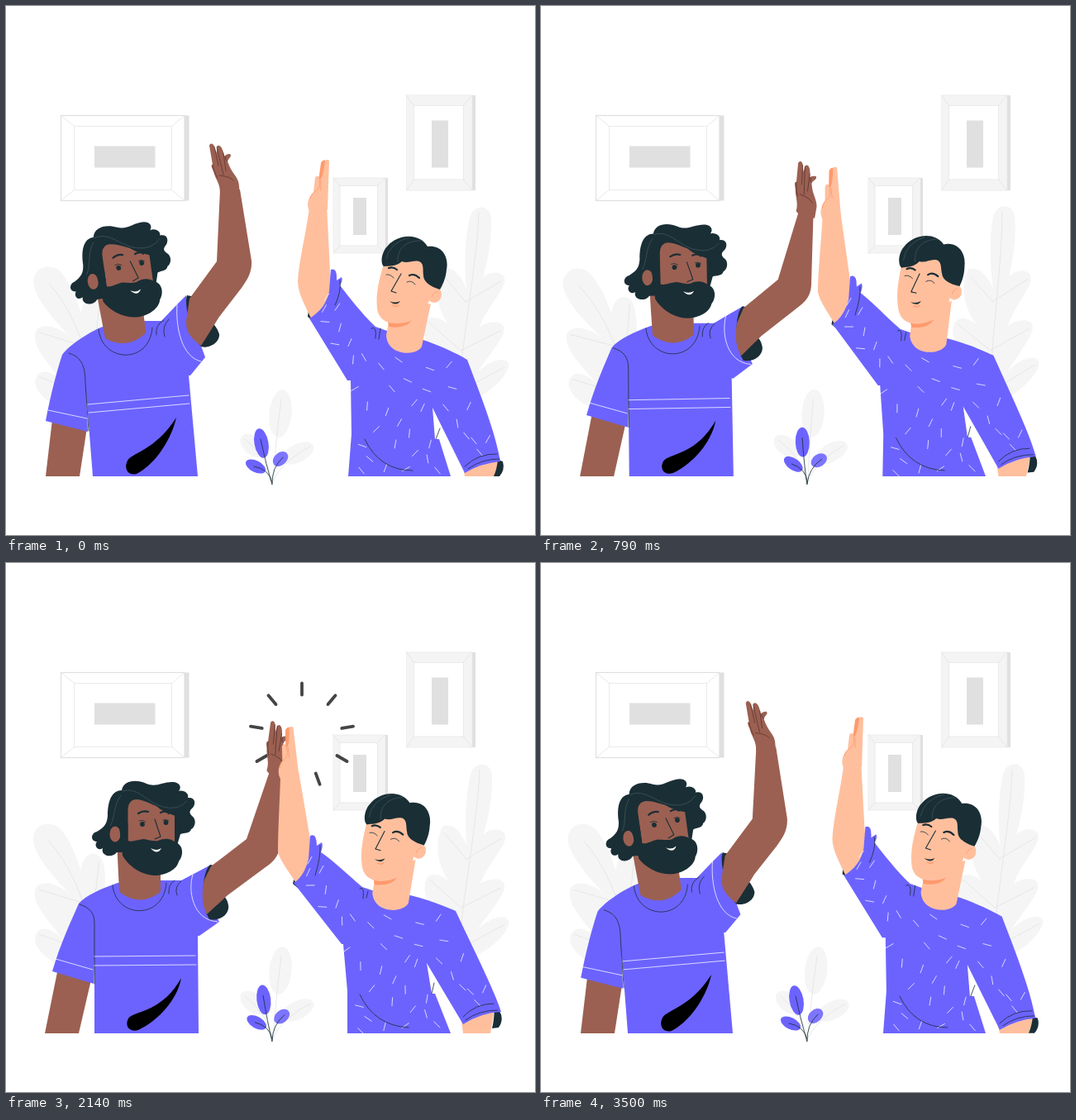
These frames come from a looping animation (640x640 px, 3.57 s). An HTML page:

```html
<!DOCTYPE html>
<html lang="en">
<head>
<meta charset="utf-8">
<title>High five</title>
<style>
html, body { margin: 0; width: 100%; height: 100%; overflow: hidden; background: #fff; }
svg { display: block; width: 100vw; height: 100vh; }
path, line { stroke-linecap: round; stroke-linejoin: round; }
.p { fill: #6c63ff; }
.d { fill: #1a2e35; }
.brown { fill: #9b6052; }
.peach { fill: #ffbf9d; }
.orange { fill: #ff9a6c; }
.k { fill: none; stroke: #1a2e35; stroke-width: .8; }
.w { fill: none; stroke: #fff; stroke-width: .75; }
.thick { stroke-width: 2.2; }
.nose { stroke-width: 1.1; }
.hair { fill: none; stroke: #4a5f68; stroke-width: .6; }
.crease { fill: none; stroke: #4b2a25; stroke-width: .6; }
.leaf { fill: #f5f5f5; }
.vein { fill: none; stroke: #e3e3e3; stroke-width: .8; }
</style>
</head>
<body>
<svg viewBox="0 0 640 640">
  <g id="frames"></g>
  <g id="plantL">
    <path class="leaf" d="M100 505C80 492 38 480 35 455C38 436 56 440 70 457C52 432 30 412 36 393C45 381 66 390 78 401C56 378 28 346 34 328C40 311 60 312 69 325C80 340 85 354 91 372C92 354 107 345 116 358C123 372 120 400 118 440Z"/>
    <path class="vein" d="M52 336Q88 375 108 460M40 395L96 412M113 362L106 420M40 449L100 470"/>
  </g>
  <g id="plantR">
    <path class="leaf" d="M545 500C530 460 512 430 506 395C505 374 520 372 535 385C519 362 518 335 528 318C540 314 550 325 557 342C553 310 557 262 563 251C569 240 586 240 587 258C588 285 582 310 577 328C590 318 606 322 603 335C598 350 580 368 573 388C590 378 606 382 602 395C598 408 578 430 570 444C585 427 610 422 608 437C602 455 580 470 560 480Z"/>
    <path class="vein" d="M572 250C570 310 552 400 545 490M599 333L556 358M530 327L556 358M598 393L550 417M512 383L550 417M603 437L546 468"/>
  </g>
  <g id="burst" stroke="#454545" stroke-width="3.8"></g>
  <g id="left"></g>
  <g id="right"></g>
  <g id="grayPlant">
    <ellipse class="leaf" cx="332" cy="493" rx="13.5" ry="29" transform="rotate(6 332 493)"/>
    <ellipse class="leaf" cx="299" cy="532" rx="18" ry="11" transform="rotate(40 299 532)"/>
    <ellipse class="leaf" cx="353" cy="541" rx="21" ry="11" transform="rotate(-27 353 541)"/>
    <path class="vein" d="M333 476Q326 530 323 575M289 524Q315 545 322 572M368 533Q335 550 323 574"/>
  </g>
  <g id="purplePlant">
    <ellipse class="p" cx="309" cy="529" rx="8.5" ry="18" transform="rotate(-10 309 529)"/>
    <ellipse class="p" cx="302" cy="557" rx="13" ry="7" transform="rotate(27 302 557)"/>
    <ellipse cx="332" cy="548" rx="10.5" ry="7.5" fill="#7d75ff" transform="rotate(-42 332 548)"/>
    <path class="k" d="M308 524Q315 556 322 579Q321 559 335 546M300 557Q318 560 322 576"/>
  </g>
</svg>
<script>
const LOOP = 3570, TAU = Math.PI * 2;
const $ = id => document.getElementById(id);
const clamp = x => Math.max(0, Math.min(1, x));
const ease = x => (1 - Math.cos(Math.PI * clamp(x))) / 2;
const lerp = (a, b, k) => a + (b - a) * k;

function add(parent, tag, attrs) {
  const el = document.createElementNS('http://www.w3.org/2000/svg', tag);
  for (const name in attrs) el.setAttribute(name, attrs[name]);
  return parent.appendChild(el);
}
function group(parent, html) {
  const g = add(parent, 'g', {});
  g.innerHTML = html;
  return g;
}

// Path between two poses that share the same commands
const num = /-?\d+(\.\d+)?/g;
function mix(a, b, k) {
  const to = b.match(num);
  let i = 0;
  return a.replace(num, n => lerp(+n, +to[i++], k).toFixed(2));
}

const parts = { left: [], right: [] };
function part(side, cls, a, b) {
  parts[side].push({ el: add($(side), 'path', { class: cls }), a, b });
}

// Pictures on the wall: outer box, inner inset, depth, plate
function picture(x, y, w, h, ix, iy, iw, ih, depth, plate, fill, edge) {
  const g = $('frames');
  add(g, 'rect', { x: x + w, y, width: depth, height: h, fill: '#e0e0e0' });
  add(g, 'rect', { x, y, width: w, height: h, fill, stroke: edge, 'stroke-width': 1.2 });
  add(g, 'rect', { x: ix, y: iy, width: iw, height: ih, fill: '#fff', stroke: '#e6e6e6', 'stroke-width': .8 });
  const X = x + w, Y = y + h, jx = ix + iw, jy = iy + ih;
  add(g, 'path', { class: 'vein', d: `M${x} ${y}L${ix} ${iy}M${X} ${y}L${jx} ${iy}M${x} ${Y}L${ix} ${jy}M${X} ${Y}L${jx} ${jy}` });
  const [px, py, pw, ph] = plate;
  add(g, 'rect', { x: px, y: py, width: pw, height: ph, fill: '#e0e0e0' });
}
picture(66.5, 132.5, 149.5, 103, 82.5, 145.5, 118, 77, 5.5, [107, 169.5, 73.5, 26], '#fff', '#e0e0e0');
picture(484.5, 108, 79, 115, 493.5, 120.5, 60, 89.5, 4.5, [515, 138.5, 20, 57], '#f4f4f4', '#f0f0f0');
picture(396, 208, 62.5, 91, 404, 217.5, 45.5, 72.5, 3.5, [420, 232, 16, 45], '#f4f4f4', '#f0f0f0');

// Left man
part('left', 'brown', 'M56 500L48 569L89 569L98 510Z', 'M63 490L47 569L88 569L104 500Z');
part('left', 'p',
  'M117 388C97 396 75 412 68 422C62 440 54 470 48 502L99 515L97 468L105 569L232 569L221 447L223 447L241 425C233 402 220 372 218 350L207 361L188 381L168 381Z',
  'M135 387C115 394 97 402 88 412C78 435 66 460 56 494L106 509L107 478L107 569L233 569L232 451L234 451L258 434C246 414 246 385 248 365L233 373L212 384L187 384Z');
part('left', 'k', 'M76 420C90 424 96 434 96 456L100 514', 'M89 413C102 417 107 424 107 436L107 509');
part('left', 'k', 'M112 391C116 432 174 434 177 389M182 398Q180 386 191 380M192 400Q188 388 197 379',
  'M129 390C133 431 191 432 194 387M197 400Q196 389 204 384M207 402Q203 392 212 385');
part('left', 'w', 'M99 482L221 471M100 492L222 481M51 489L98 499', 'M107 476L229 475M107 487L230 486M60 479L105 492');
part('left', 'w', 'M207 361C205 390 213 425 236 430', 'M226 377C220 395 225 432 256 434');
part('left', 'blot', 'M206 498C200 525 180 555 158 566C148 569 142 560 147 550C153 540 180 538 206 498Z',
  'M212 502C207 530 182 555 160 565C150 568 143 561 148 551C155 541 188 545 212 502Z');
const headL = group($('left'), `
  <path class="brown" d="M134 335L137 398Q162 417 187 398L187 365Z"/>
  <path class="d" d="M134 350C128 358 114 354 117 345C111 349 106 342 110 337C102 337 102 327 110 325C118 320 122 317 123 306C123 286 129 275 140 275C142 263 157 261 170 267C182 272 190 264 203 265C210 266 213 271 209 276C215 274 222 279 220 284C229 283 230 291 226 296C221 300 222 303 225 306C231 310 229 320 224 322C222 328 216 326 211 328L206 345L140 350Z"/>
  <path class="brown" d="M147.5 300C147.5 291 151 286 158 286C172 287 180 297 204 299L204 345L147.5 350Z"/>
  <ellipse class="brown" cx="132" cy="328" rx="6.5" ry="9.5"/>
  <path class="d" d="M137 318L147.5 314L147.5 336C153 338 157 335 167 334C173 335 178 337 184 336C194 331 202 335 205 338C215 341 215 354 209 361C207 371 193 378 180 378C162 377 148 366 141 354Z"/>
  <path class="d" d="M174 283C180 297 192 301 205 306L212 290Z"/>
  <path class="hair" d="M141 276C160 270 170 290 190 295Q208 300 219 288M126 318C132 309 130 292 139 281"/>
  <path class="k thick" d="M160 303Q166 299 172 301M187 302Q193 299 197 303"/>
  <circle class="d" cx="165" cy="316" r="2.9"/><circle class="d" cx="193.5" cy="314" r="2.9"/>
  <path class="k nose" d="M180 310L187 331L180 334"/>
  <path class="k" d="M161 312Q165 310 169 313M190 311Q194 309 197 312"/>
  <path d="M175 345Q182 349 188 345Q183 354 175 345Z" fill="#fff"/>`);
part('left', 'd', 'M219 350C215 360 224 400 236 412C246 415 259 407 258 397C255 388 250 383 246 380L224 351Z',
  'M247 365C236 375 236 415 246 431C258 434 271 425 269 414C268 407 265 404 262 402L252 366Z');
part('left', 'brown',
  'M222 354L255 309L259 222L283 222L297 308C298 322 292 331 285 341L258 376L236 411C224 403 217 393 218 381Z',
  'M248 367L291 334L319 252L336 250L331 343C330 355 323 362 314 368L268 402L243 425C236 412 237 395 240 383Z');
const handL = group($('left'), `
  <path class="brown" d="M259 226C259 214 253 209 251 200C248 194 248 192 250 192L246 169C247 165 251 166 252 170L255 178L255 170C257 167 261 169 263 177L265 184C263 181 267 179 271 179C274 182 269 184 268 188L270 193C274 203 282 208 282 218L283 228Q270 234 259 226Z"/>
  <path class="crease" d="M250 192Q252 202 256 208M252 170L257 193M255 171L263 204M263 178L266 199M268 188Q265 186 265 182M258 205Q271 206 275 211"/>`);

// Right man
part('right', 'peach', 'M555 569L553 559Q575 545 598 548L590 569Z', 'M553 569L551 554Q572 540 591 540L586 569Z');
part('right', 'd', 'M590 569Q594 560 595 549L601 551Q604 561 597 569Z', 'M588 563Q590 556 591 540L597 542Q603 552 596 562Z');
part('right', 'd', 'M366 368L365 376L372 381L385 360Z', 'M349 380L347 388L354 394L366 368Z');
part('right', 'peach',
  'M367 244C363 275 354 310 353 334C354 350 362 362 369 378L380 376L394 345L392 320L388 240Z',
  'M332 260C331 290 329 325 329 350C332 360 340 370 352 389L362 385L372 355L367 328L354 252Z');
part('right', 'p',
  'M461 393L447 388C430 372 415 352 404 338Q408 332 406 328L400 332Q401 316 393 319L391 345C388 360 380 370 367 378L413 453L417 453L418 518L414 569L538 569L524 524L519 524L516 486L555 565Q575 553 598 551C592 515 572 465 558 428C545 420 525 411 505 404Z',
  'M446 397L431 392C412 376 396 360 381 350Q384 342 382 338L376 342Q376 326 368 330L366 358C363 370 357 382 348 387L406 461L408 461L413 518L413 569L538 569L519 521L515 521L509 484L553 558Q575 544 599 543C590 515 562 460 544 421C530 415 510 407 489 402Z');
const dashes = [
  388,352,-55, 385,366,-60, 401,364,125, 386,382,5, 404,389,105, 416,407,115, 398,409,10, 433,425,60, 420,428,95,
  422,463,-30, 454,436,50, 475,428,35, 513,439,20, 536,434,-50, 486,453,25, 509,465,20, 540,462,15, 467,463,50,
  437,484,95, 461,491,110, 476,504,-60, 494,480,-50, 504,486,115, 448,512,-45, 488,517,95, 431,532,20, 471,530,100,
  440,548,40, 495,541,-45, 510,548,80, 513,530,105, 430,562,50, 459,559,110, 484,560,-30, 522,562,50, 546,505,80,
  560,484,115, 557,520,50, 566,526,50, 583,524,-60, 573,540,50, 532,486,50];
const dashEl = add($('right'), 'path', { class: 'w' });
part('right', 'k', 'M434 524Q452 562 492 562M442 390Q449 386 447 402M453 390L451 403M398 362Q406 345 404 332M520 524L525 511',
  'M428 522Q446 560 487 562M428 394Q434 390 432 406M438 397L436 405M374 378Q381 355 380 342M515 521L518 508');
part('right', 'k', 'M555 557Q572 541 594 542M559 560Q575 548 597 548', 'M553 549Q568 533 590 533M556 553Q572 541 595 541');
const headR = group($('right'), `
  <path class="peach" d="M465 375L460 398C461 424 497 424 503 412L514 360Z"/>
  <path class="orange" d="M462 381L491 380Q484 391 463 388Z"/>
  <path class="peach" d="M458 308C452 330 447 345 449 366C451 381 464 385 476 384C492 383 502 374 509 366L520 330L500 300Z"/>
  <ellipse class="peach" cx="518" cy="349" rx="9" ry="10"/>
  <path d="M515 352Q518 345 522 346" fill="none" stroke="#ff9a6c" stroke-width=".8"/>
  <path class="d" d="M457 315C452 311 455 296 462 290C474 276 500 274 510 291C528 289 536 304 533 319C532 330 528 338 525 343C512 339 505 333 505 326C504 318 506 312 500 309C492 307 486 312 479 309C471 316 463 314 457 315Z"/>
  <path class="hair" d="M474 309C473 295 483 283 503 284M460 306Q464 286 488 280"/>
  <path class="k thick" d="M463 317Q468 315 473 319M488 326Q494 323 500 329"/>
  <path class="k" d="M460 325Q465 324 469 329M485 334Q491 331 495 337"/>
  <path class="k nose" d="M478 324L466 345L472 347"/>
  <path class="d" d="M464 357Q470 360 477 357Q472 364 464 357Z"/>
  <path d="M468 362Q472 365 475 362" fill="none" stroke="#ff9a6c" stroke-width="1.2"/>`);
const handR = group($('right'), `
  <path class="orange" d="M378 212L381 190Q383 185 388 187L388 215Z"/>
  <path class="peach" d="M367 248C363 240 366 231 372 225L374 208Q376 204 379 207L380 210Q384 206 386 187Q389 185 391 187L389 246Q377 254 367 248Z"/>
  <path d="M379 207Q381 218 377 222Q369 227 368 233M381 211L381 223" fill="none" stroke="#ff9a6c" stroke-width=".8"/>`);

const rays = Array.from({ length: 9 }, () => add($('burst'), 'line', {}));

const move = (el, dx, dy, deg, x, y) =>
  el.setAttribute('transform', `translate(${dx} ${dy}) rotate(${deg} ${x} ${y})`);
// Value from -1 to 1, highest at time `peak`
const sway = (t, period, peak) => Math.cos(TAU * (t - peak) / period);

function drawDashes(k) {
  let d = '';
  for (let i = 0; i < dashes.length; i += 3) {
    const [x, y, deg] = dashes.slice(i, i + 3);
    const cx = x - k * (569 - y) * .095, cy = y + k * (480 - x) * .085;
    const a = (deg - 6 * k) * TAU / 360, u = 5 * Math.cos(a), v = 5 * Math.sin(a);
    d += `M${cx - u} ${cy - v}L${cx + u} ${cy + v}`;
  }
  dashEl.setAttribute('d', d);
}

function drawBurst(t) {
  $('burst').style.display = t > 1040 && t < 2350 ? '' : 'none';
  const g = ease((t - 1040) / 440);
  const r = t < 1480 ? lerp(16, 70, g) : 66.5 - 3.5 * sway(t, 440, 2140);
  const inner = r - lerp(10, 14, g), cx = lerp(311, 358, g), cy = 208.5;
  rays.forEach((ray, i) => {
    const a = TAU * (i / 9 - .25), c = Math.cos(a), s = Math.sin(a);
    ray.setAttribute('x1', cx + inner * c);
    ray.setAttribute('y1', cy + inner * s);
    ray.setAttribute('x2', cx + r * c);
    ray.setAttribute('y2', cy + r * s);
  });
}

function draw(t) {
  const l = t < 1800 ? ease(t / 1020) : 1 - ease((t - 2500) / 1110);
  const r = t < 1800 ? ease(t / 1180) : 1 - ease((t - 2500) / 1110);
  for (const p of parts.left) p.el.setAttribute('d', mix(p.a, p.b, l));
  for (const p of parts.right) p.el.setAttribute('d', mix(p.a, p.b, r));

  move(headL, -29 * (1 - l), l - 1, -8 * (1 - l), 179, 315);
  move(handL, 57 * l, 29 * l, 17.5 * l, 271, 222);
  const back = ease((t - 1100) / 1000) * (1 - ease((t - 2150) / 550));
  move(headR, -24 * r + 5 * back, r, -6.3 * r + 3.8 * back, 467, 346);
  move(handR, -34.5 * r, 13 * r, -8.7 * r, 377, 246);
  drawDashes(r);
  drawBurst(t);

  move($('plantL'), 0, 0, 1.6 * (sway(t, LOOP / 2, 150) - .85), 100, 500);
  move($('plantR'), 0, 0, 2.1 * (sway(t, LOOP / 2, 200) - .76), 540, 560);
  move($('grayPlant'), 0, 0, 2.9 * (sway(t, LOOP / 3, -120) - .8), 322, 575);
  move($('purplePlant'), 0, 0, 4.3 * (1 - sway(t, LOOP / 2, -20)), 322, 578);
}

const start = performance.now();
function tick() {
  draw((performance.now() - start) % LOOP);
  requestAnimationFrame(tick);
}
tick();
</script>
</body>
</html>
```
